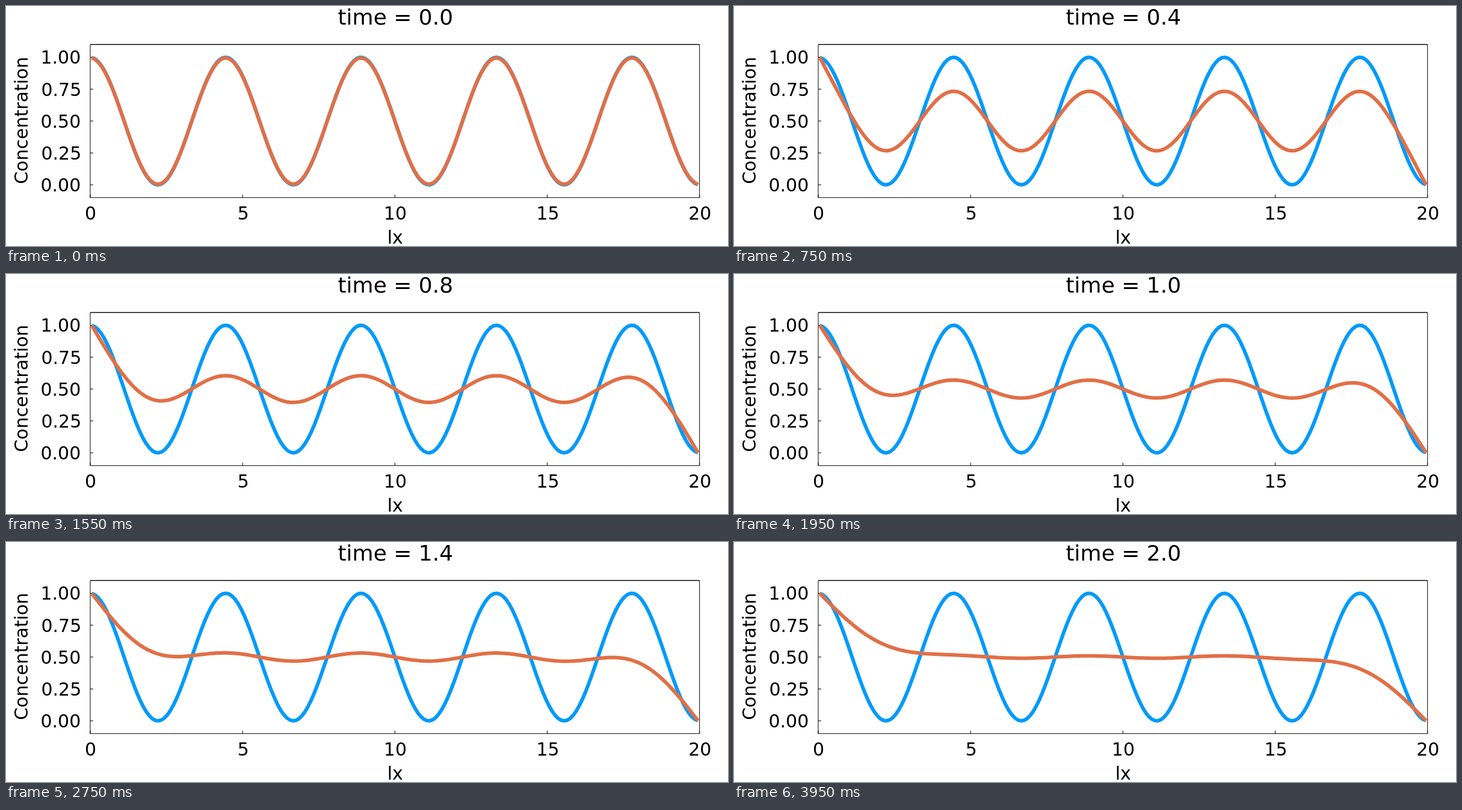
Write an HTML page with a canvas that moves like this. It is 1200x400 px and loops after 4000 ms.

```html
<!DOCTYPE html>
<html lang="en">
<head>
<meta charset="utf-8">
<title>Diffusion</title>
<style>
  html, body { margin: 0; width: 100%; height: 100%; overflow: hidden; background: #fff; }
  canvas { display: block; }
</style>
</head>
<body>
<canvas id="stage" width="1200" height="400"></canvas>
<script>
const ctx = document.getElementById("stage").getContext("2d");

// Explicit 1D diffusion on cell centres, with fixed end values
const LX = 20, NX = 200, DX = LX / NX, DT = DX * DX / 2;
const FRAME_MS = 50, FRAMES = 80, STEPS_PER_FRAME = 5;
const LEFT = 140, RIGHT = 1152.7, TOP = 64.2, BOTTOM = 319.3;

const px = x => LEFT + (RIGHT - LEFT) * x / LX;
const py = c => BOTTOM - (BOTTOM - TOP) * (c + 0.1) / 1.2;

const initial = Array.from({ length: NX }, (_, i) =>
  0.5 + 0.5 * Math.cos(9 * Math.PI * (i + 0.5) / NX));

const diffuse = c => c.map((v, i) =>
  i === 0 || i === NX - 1 ? v : (c[i - 1] + c[i + 1]) / 2);

const profiles = [];
let state = initial;
for (let step = 1; profiles.length < FRAMES; step++) {
  state = diffuse(state);
  if (step % STEPS_PER_FRAME === 1) {
    profiles.push({ time: (step * DT).toFixed(1), values: state });
  }
}

// Aligns by the inked right edge: 0.5 centres, 1 right-aligns
function text(str, x, y, size, align = 0.5) {
  ctx.font = `${size}px "DejaVu Sans", sans-serif`;
  ctx.fillText(str, x - align * ctx.measureText(str).actualBoundingBoxRight, y);
}

function line(points, color, width) {
  ctx.beginPath();
  points.forEach(([x, y]) => ctx.lineTo(x, y));
  ctx.strokeStyle = color;
  ctx.lineWidth = width;
  ctx.stroke();
}

const curve = (values, color) =>
  line(values.map((c, i) => [px((i + 0.5) * DX), py(c)]), color, 6);

function drawAxes() {
  ctx.fillStyle = "#000";
  line([[LEFT, TOP], [RIGHT, TOP], [RIGHT, BOTTOM], [LEFT, BOTTOM], [LEFT, TOP], [RIGHT, TOP]], "#000", 1);
  for (let x = 0; x <= LX; x += 5) {
    line([[px(x), BOTTOM], [px(x), BOTTOM - 5]], "#000", 1);
    text(String(x), px(x), 356, 30);
  }
  for (let c = 0; c <= 1; c += 0.25) {
    line([[LEFT, py(c)], [LEFT + 5, py(c)]], "#000", 1);
    text(c.toFixed(2), 123.2, py(c) + 11, 30, 1);
  }
  text("lx", (LEFT + RIGHT) / 2, 396, 30);
  ctx.save();
  ctx.translate(35.5, (TOP + BOTTOM) / 2);
  ctx.rotate(-Math.PI / 2);
  text("Concentration", 0, 0, 30);
  ctx.restore();
}

function draw(now) {
  const { time, values } = profiles[Math.floor(now / FRAME_MS) % FRAMES];
  ctx.fillStyle = "#fff";
  ctx.fillRect(0, 0, 1200, 400);
  drawAxes();
  text("time = " + time, (LEFT + RIGHT) / 2, 31, 36);
  curve(initial, "#009afa");
  curve(values, "#e26f46");
}

const start = performance.now();
function tick() {
  draw(performance.now() - start);
  requestAnimationFrame(tick);
}
tick();
</script>
</body>
</html>
```
